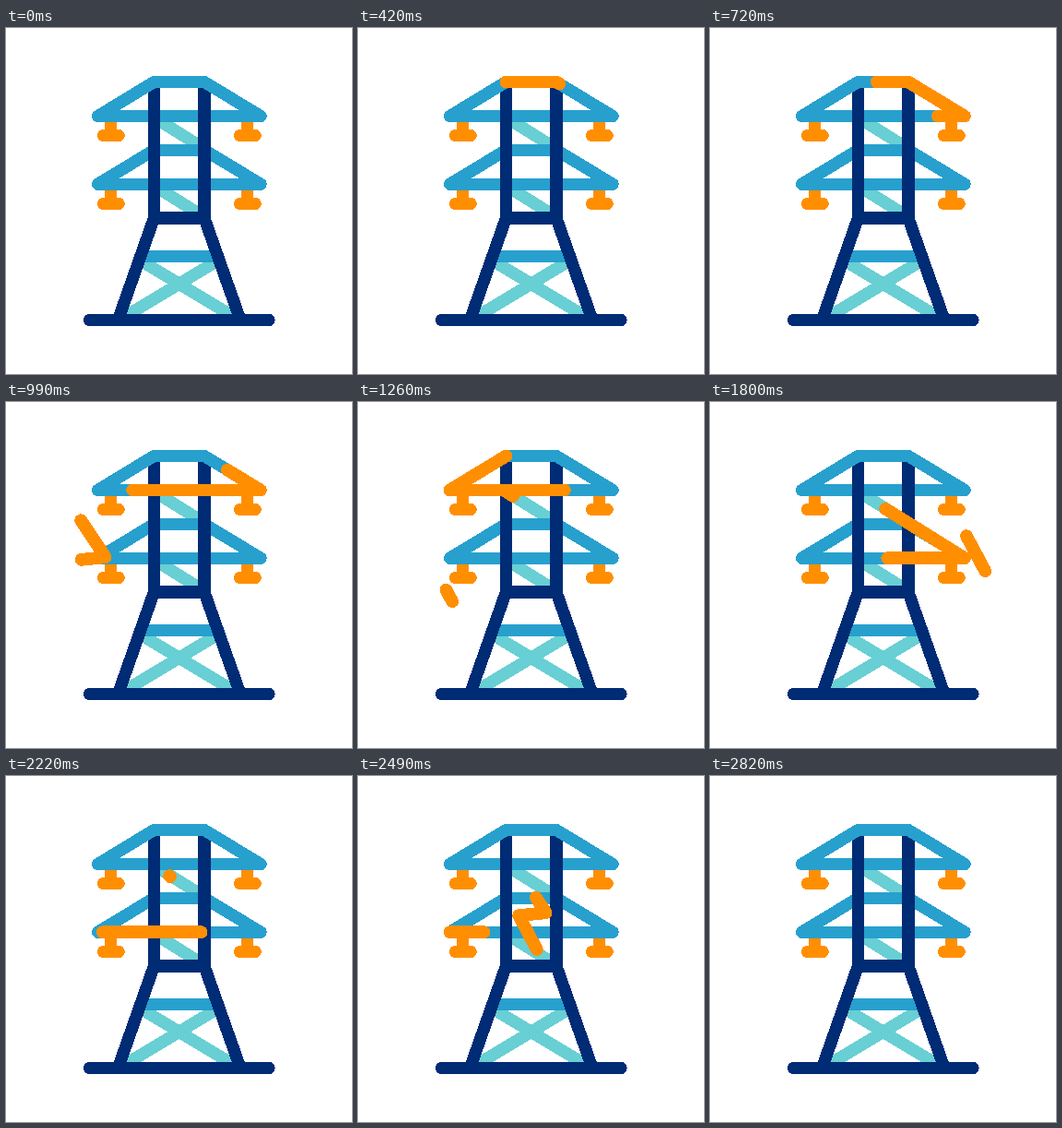
An HTML page that plays this animation: 375 px wide and 375 px high, repeating every 4530 ms.

```html
<!DOCTYPE html>
<html lang="en">
<head>
<meta charset="utf-8">
<title>Power pylon</title>
<style>
  html, body { margin: 0; width: 100%; height: 100%; overflow: hidden; background: #fff; }
  svg { display: block; width: 100vw; height: 100vh; shape-rendering: crispEdges; }
  path { fill: none; stroke-width: 13.2; stroke-linecap: round; stroke-linejoin: round; }
  .navy { stroke: #002b75; }
  .blue { stroke: #27a0ce; }
  .teal { stroke: #68cfd4; }
  .orange { stroke: #ff8f00; }
  .flat { stroke-linecap: butt; }
  #sparks path { stroke-width: 13.8; }
</style>
</head>
<body>
<svg viewBox="-0.2 -0.2 375 375">
  <path class="teal flat" d="M160 96.5 214.5 130.5M160 170.5 214.5 204.5M131 311.2 228 252.7M244 311.2 147 252.7"/>
  <path class="orange flat" d="M113.5 96V116M261.5 96V116M113.5 170V190M261.5 170V190"/>
  <path class="orange" d="M105.3 116.3H122M253.3 116.3H270M105.3 190.2H122M253.3 190.2H270"/>
  <path class="blue" d="M99.3 95.3H275.9M160.3 132.1H214.7M160.3 132.1 99.3 169H275.9L214.7 132.1M150 247.3H225"/>
  <path class="navy" d="M160.3 60V205.7H214.7V60M160.3 205.7 121.2 316.3M214.7 205.7 253.8 316.3M90.4 316.3H284.8"/>
  <path class="blue" d="M99.3 95.3 160.3 58.3H214.7L275.9 95.3"/>
  <g id="sparks"></g>
</svg>
<script>
  const LOOP = 4530, STEP = 30, LAST = 94;
  const sparks = document.getElementById('sparks');

  function addPath(d) {
    const el = document.createElementNS('http://www.w3.org/2000/svg', 'path');
    el.setAttribute('d', d);
    el.setAttribute('class', 'orange');
    sparks.append(el);
    return { el, length: el.getTotalLength() };
  }

  // Strokes of one run are traced one after another by the same head and tail.
  function addRun(shapes, start, duration, lag) {
    const parts = shapes.map(addPath);
    const total = parts.reduce((sum, part) => sum + part.length, 0);
    return { parts, total, start, duration, lag };
  }

  const addBolt = (x, y, start) =>
    addRun([`M${x} ${y}l26.5 40 -29.5 3 24 45`], start, 11.6, 6.2);

  const runs = [
    addRun([
      'M160.3 58.3H214.7L275.7 95.3H99.3L160.3 58.3',
      'M160.3 97 275.7 169H99.3'
    ], 0, 78, 16),
    addBolt(81, 128, 26.6),
    addBolt(277, 95, 46.7),
    addBolt(177, 108, 73.3)
  ];

  const clamp = (v, lo, hi) => Math.min(hi, Math.max(lo, v));
  const ease = v => { const t = clamp(v, 0, 1); return t * t * (3 - 2 * t); };

  function drawRun({ parts, total, start, duration, lag }, frame) {
    const head = total * ease((frame - start) / duration);
    const tail = total * ease((frame - start - lag) / duration);
    let offset = 0;
    for (const { el, length } of parts) {
      const from = clamp(tail - offset, 0, length);
      const to = clamp(head - offset, 0, length);
      el.style.display = to > from ? '' : 'none';
      el.style.strokeDasharray = `${to - from} 9999`;
      el.style.strokeDashoffset = -from;
      offset += length;
    }
  }

  const origin = performance.now();
  function draw(now) {
    const time = Math.max(0, now - origin) % LOOP;
    const frame = Math.min(LAST, Math.floor(time / STEP));
    for (const run of runs) drawRun(run, frame);
    requestAnimationFrame(draw);
  }
  draw(origin);
</script>
</body>
</html>
```
